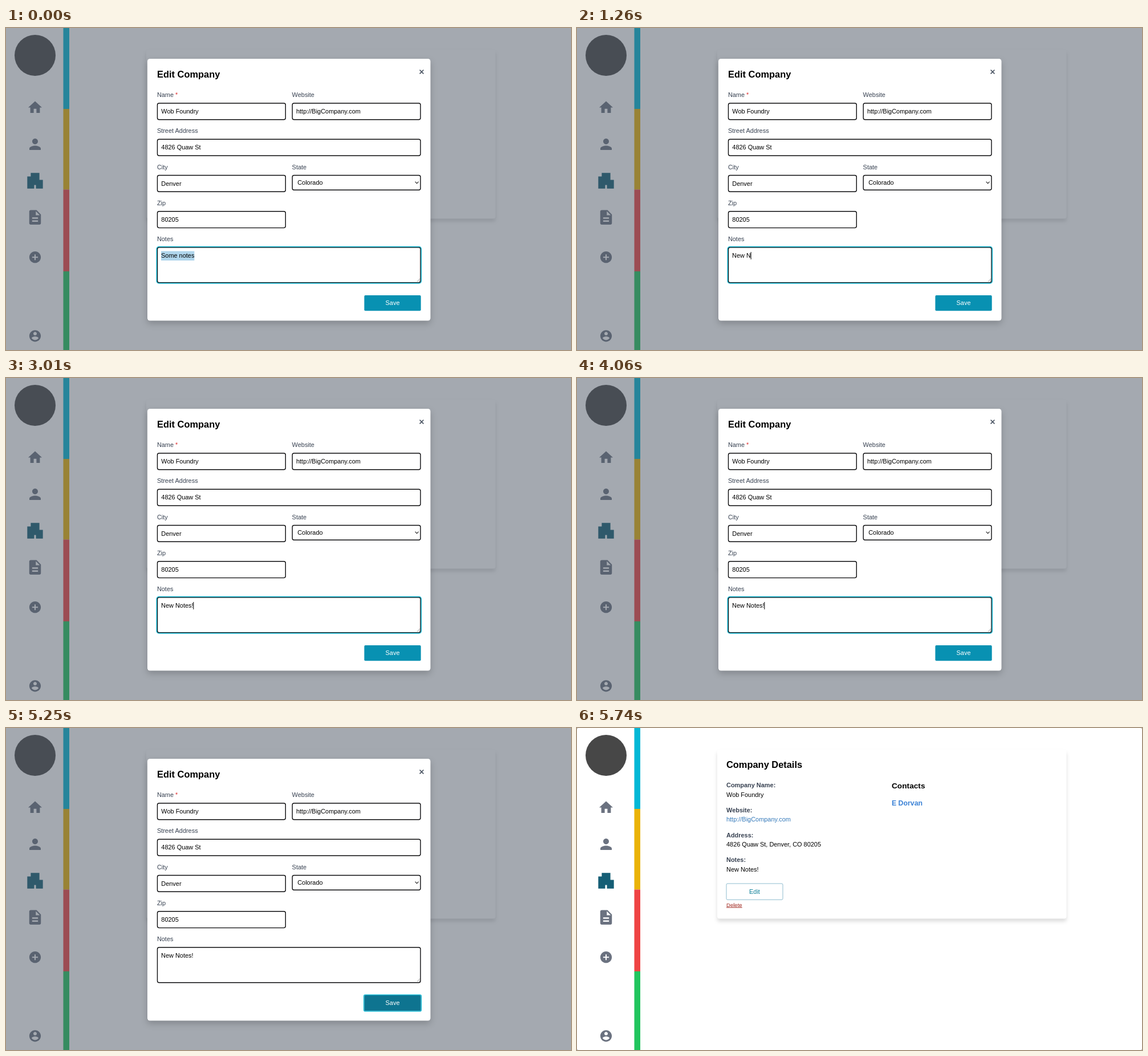
An HTML page that plays this animation: 991 px wide and 565 px high, repeating every 8000 ms.

```html
<!DOCTYPE html>
<html lang="en">
<head>
<meta charset="utf-8">
<title>Edit Company</title>
<style>
  html, body { margin: 0; width: 100%; height: 100%; overflow: hidden; background: #8b8d90; }
  svg { display: block; width: 991px; height: 565px; border-radius: 2px; background: #fff; }
  text { font: 10.94px "Liberation Sans", Arial, sans-serif; white-space: pre; }
  .b { font-weight: bold; }
  .h1 { font-size: 16.42px; }
  .h2 { font-size: 13.68px; }
  .h3 { font-size: 12.31px; }
  .small { font-size: 9.58px; text-decoration: underline; }
  .mid { text-anchor: middle; }
  .label { fill: #374151; }
  .card { fill: #fff; filter: drop-shadow(0 5px 3px #0002); }
  .modal { fill: #fff; filter: drop-shadow(0 5px 6px #0003); }
  .field { fill: #fff; stroke: #0b0b0d; stroke-width: 1.4; }
  .ring { fill: none; stroke: #16b5d0; stroke-width: 1.5; }
</style>
</head>
<body>
<svg viewBox="0 0 991 565"></svg>
<script>
const LOOP = 8000, SAVED = 5670;
const COMPANY = 'Wob Foundry', STREET = '4826 Quaw St', SITE = 'http://BigCompany.com';

const text = (x, y, str, cls = '', fill = '#000', id = '') =>
  `<text x="${x}" y="${y}" class="${cls}" style="fill:${fill}" id="${id}">${str}</text>`;
const label = (x, y, str, cls = '') => text(x, y, str, cls, '#374151');
const box = (x, y, w, h, rx, attrs) =>
  `<rect x="${x}" y="${y}" width="${w}" height="${h}" rx="${rx}" ${attrs}/>`;
const icon = (cy, scale, d, fill = '#6b7280') =>
  `<path transform="translate(51 ${cy}) scale(${scale}) translate(-12 -12)" fill="${fill}" d="${d}"/>`;
const field = (x, y, w, h, name, value, inset = 6.8) =>
  label(x - .6, y - 10.9, name) + box(x, y, w, h, 3, 'class="field"') +
  text(x + inset, y + (h < 28 ? 16.9 : 18), value);

const disc = 'M12 2C6.48 2 2 6.48 2 12s4.48 10 10 10 10-4.48 10-10S17.52 2 12 2z';
const windows = [[5, 17], [5, 13], [5, 9], [9, 13], [9, 9], [9, 5], [13, 13], [13, 9], [13, 5], [17, 17], [17, 13]]
  .map(([x, y]) => `M${x} ${y}v2h2v-2z`).join('');

const stripes = [[0, 142, '#03b8d6'], [142, 283.5, '#eab308'], [283.5, 427, '#ef4444'], [427, 565, '#22c55e']]
  .map(([top, end, fill]) => box(100.5, top, 10.5, end - top, 0, `fill="${fill}"`)).join('');

const sidebar = stripes +
  '<circle cx="51" cy="48" r="36" fill="#474747"/>' +
  icon(139.4, 1.2, 'M10 20v-6h4v6h5v-8h3L12 3 2 12h3v8z') +
  icon(204, 1.25, 'M12 12c2.21 0 4-1.79 4-4s-1.79-4-4-4-4 1.79-4 4 1.79 4 4 4zm0 2c-2.67 0-8 1.34-8 4v2h16v-2c0-2.66-5.33-4-8-4z') +
  icon(268, 1.52, 'M17 11V3H7v4H3v14h8v-4h2v4h8V11z' + windows, '#155e75') +
  icon(332.3, 1.28, 'M14 2H6c-1.1 0-2 .9-2 2v16c0 1.1.9 2 2 2h12c1.1 0 2-.9 2-2V8zm2 16H8v-2h8zm0-4H8v-2h8zm-3-5V3.5L18.5 9z') +
  icon(402.2, 1.01, disc + 'm5 11h-4v4h-2v-4H7v-2h4V7h2v4h4z') +
  icon(540.3, 1.01, disc + 'm0 3c1.66 0 3 1.34 3 3s-1.34 3-3 3-3-1.34-3-3 1.34-3 3-3zm0 14.2c-2.5 0-4.71-1.28-6-3.22.03-1.99 4-3.08 6-3.08s5.97 1.09 6 3.08c-1.29 1.94-3.5 3.22-6 3.22z');

const details = [
  ['Company Name:', COMPANY], ['Website:', SITE, '#3479ba'],
  ['Address:', STREET + ', Denver, CO 80205'], ['Notes:', 'New Notes!']
].map(([name, value, fill], i) =>
  label(262, 104 + 43.75 * i, name, 'b') + text(262, 120.5 + 43.75 * i, value, '', fill)).join('');

const page = box(246, 38, 612.5, 296.5, 4, 'class="card"') +
  text(262, 70, 'Company Details', 'b h1') + details +
  text(552, 106.3, 'Contacts', 'b h2') + text(552, 136, 'E Dorvan', 'b h3', '#3b82d6') +
  box(262, 273, 99, 28.3, 2, 'fill="#fff" stroke="#82b5ca" stroke-width=".9"') +
  text(311.5, 291, 'Edit', 'mid', '#0e8199') + text(262, 313.5, 'Delete', 'small', '#a12b22');

const dialog = box(0, 0, 991, 565, 0, 'fill="#4b5563" opacity=".5"') +
  box(248, 54, 496.5, 459.5, 4.5, 'class="modal"') +
  text(265, 87.2, 'Edit Company', 'b h1') +
  '<path d="M725.6 73.5l6.8 6.8m0-6.8l-6.8 6.8" stroke="#4b5563" stroke-width="1.7"/>' +
  field(265.5, 132, 224.8, 28.8, 'Name <tspan fill="#dc2626">*</tspan>', COMPANY) +
  field(502.2, 132, 224.8, 28.8, 'Website', SITE) +
  field(265.5, 195.2, 461.5, 28.8, 'Street Address', STREET) +
  field(265.5, 258.5, 224.8, 28.8, 'City', 'Denver') +
  field(502.2, 258.5, 224.8, 25.8, 'State', 'Colorado', 9) +
  '<path d="M717.6 269.7l3 3 3-3" fill="none" stroke="#222" stroke-width="1.1"/>' +
  field(265.5, 321.8, 224.8, 28.8, 'Zip', '80205') +
  field(265.5, 385, 461.5, 61.8, 'Notes', '') +
  box(264.2, 383.8, 464.2, 64.2, 4, 'class="ring" id="notesRing"') +
  '<path d="M721 445l5-5m-2 5l2-2" stroke="#777" stroke-width=".7"/>' +
  box(272, 391.5, 58.4, 16.5, 0, 'fill="#b0d6ec" id="selection"') +
  text(272, 403.3, '', '', '#000', 'notes') +
  box(0, 393, 1, 13, 0, 'id="caret"') +
  box(628.4, 468.9, 99.3, 27.4, 2, 'id="save"') +
  box(627.7, 468.2, 100.7, 28.8, 2.5, 'class="ring" id="saveRing"') +
  text(678, 486.2, 'Save', 'mid', '#fff');

document.querySelector('svg').innerHTML = sidebar + page + `<g id="dialog">${dialog}</g>`;

const $ = id => document.getElementById(id);
const show = (id, on) => $(id).style.display = on ? '' : 'none';

const typed = 'New Notes!';
const keyTimes = [420, 560, 630, 770, 1260, 1540, 1680, 1750, 2450, 3010];
const caretOff = [[0, 420], [2240, 2450], [3570, 4060], [4620, 5110], [5250, LOOP]];

function draw(t) {
  const count = keyTimes.filter(k => t >= k).length;
  const focusSave = t >= 5250;
  show('dialog', t < SAVED);
  if (t >= SAVED) return;
  $('notes').textContent = count ? typed.slice(0, count) : 'Some notes';
  $('caret').setAttribute('x', 272 + $('notes').getComputedTextLength() - .2);
  show('selection', !count);
  show('caret', !caretOff.some(([from, to]) => t >= from && t < to));
  show('notesRing', !focusSave);
  show('saveRing', focusSave);
  $('save').setAttribute('fill', t < 4970 ? '#0891b2' : '#0e7490');
}

const start = performance.now();
function tick() {
  draw((performance.now() - start) % LOOP);
  requestAnimationFrame(tick);
}
tick();
</script>
</body>
</html>
```
